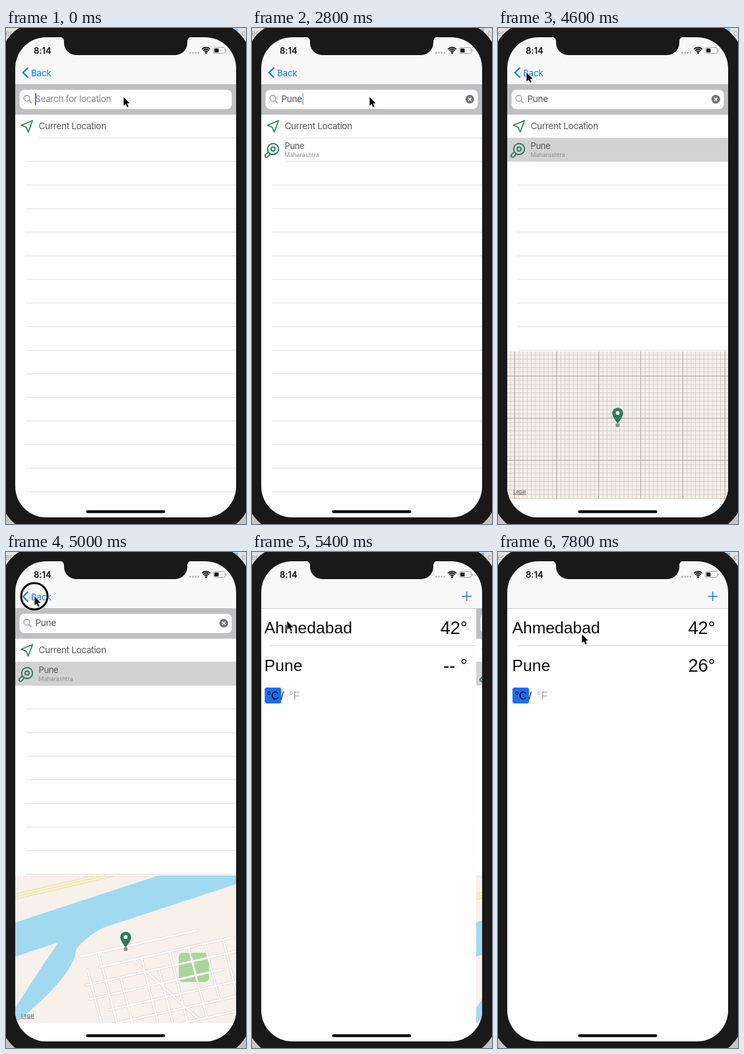
Write an HTML page with a canvas that moves like this. It is 364x750 px and loops after 8 s.

```html
<!DOCTYPE html>
<html lang="en">
<head>
<meta charset="utf-8">
<title>Location search</title>
<style>
html, body { margin: 0; width: 100%; height: 100%; overflow: hidden; background: #191919; }
canvas { display: block; width: 364px; height: 750px; }
</style>
</head>
<body>
<canvas id="stage"></canvas>
<script>
const LOOP = 8000, STEP = 200;
const LEFT = 14, RIGHT = 349, TOP = 14, BOTTOM = 740, WIDTH = RIGHT - LEFT;
const NAV = 85, ROW = 35.67, MAP_TOP = 489, MAP_H = 223;
const UI = 'Inter, sans-serif', HELV = '"Liberation Sans", Arial, sans-serif';
const BLUE = '#147be6', GREEN = '#2b7d5b', BEZEL = '#191919';
const GREY = '#85858a', LABEL = '#55565a', INK = '#0a0a0a';

const canvas = document.getElementById('stage');
const ctx = canvas.getContext('2d');
const dpr = window.devicePixelRatio || 1;
canvas.width = 364 * dpr;
canvas.height = 750 * dpr;

const QUERY = 'Pune', keyTimes = [1200, 1600, 2200, 2600];
const taps = [3800, 5000];
const pointerStart = { x: 178, y: 104 };
const pointerMoves = [
  { from: 2800, to: 3400, x: 143, y: 184 },
  { from: 4000, to: 4600, x: 43, y: 67 },
  { from: 5200, to: 5400, x: 53, y: 104 },
  { from: 6000, to: 6600, x: 190, y: 208 },
  { from: 6600, to: 7000, x: 321, y: 68 },
  { from: 7200, to: 7800, x: 127, y: 124 }
];

const clamp = v => Math.min(1, Math.max(0, v));

function seeded(seed) {
  return () => (seed = seed * 16807 % 2147483647) / 2147483647;
}
function rect(x, y, w, h, color) {
  ctx.fillStyle = color;
  ctx.fillRect(x, y, w, h);
}
function pill(x, y, w, h, r, color) {
  ctx.fillStyle = color;
  ctx.beginPath();
  ctx.roundRect(x, y, w, h, r);
  ctx.fill();
}
function stroke(color, width) {
  ctx.strokeStyle = color;
  ctx.lineWidth = width;
  ctx.stroke();
}
function disc(x, y, r, color) {
  ctx.fillStyle = color;
  ctx.beginPath();
  ctx.arc(x, y, r, 0, 7);
  ctx.fill();
}
function ring(x, y, r, color, width) {
  ctx.beginPath();
  ctx.arc(x, y, r, 0, 7);
  stroke(color, width);
}
function trace(pts) {
  ctx.beginPath();
  for (let i = 0; i < pts.length; i += 2) ctx.lineTo(pts[i], pts[i + 1]);
}
function line(pts, color, width) {
  trace(pts);
  stroke(color, width);
}
function text(str, x, y, size, color, opt = {}) {
  ctx.font = `${opt.weight || 400} ${size}px ${opt.font || UI}`;
  ctx.letterSpacing = (opt.gap || 0) + 'px';
  ctx.textAlign = opt.align || 'left';
  ctx.fillStyle = color;
  ctx.fillText(str, x, y);
  const width = ctx.measureText(str).width;
  ctx.letterSpacing = '0px';
  return width;
}
const body = (str, x, y, color, size = 13.7) => text(str, x, y, size, color, { gap: -0.38 });
const big = (str, x, y, size, color = INK, align = 'left') => text(str, x, y, size, color, { font: HELV, align });

function pointerAt(t) {
  let { x, y } = pointerStart;
  for (const m of pointerMoves) {
    const p = clamp((t - m.from) / (m.to - m.from));
    x += (m.x - x) * p;
    y += (m.y - y) * p;
  }
  return [x, y];
}

// critically damped spring, 0 to 1
function slideAt(t) {
  const u = Math.max(0, t - 5158) * 0.0227;
  return t >= 5600 ? 1 : 1 - (1 + u) * Math.exp(-u);
}

function desktop() {
  rect(0, 0, 364, 750, '#c4c4c4');
  rect(0, 0, 364, 30, '#e2e1e2');
  text('erA', -1, 12, 11, '#a5a5a5');
  rect(340, 1, 12, 12, '#6fc6e2');
  text('co', 357, 12, 11, '#a5a5a5');
  pill(-10, -10, 383, 774, 64, BEZEL);
}

function notch() {
  const l = 88, r = 275, bottom = 41;
  ctx.beginPath();
  ctx.moveTo(l - 8, TOP - 1);
  ctx.arcTo(l, TOP, l, bottom, 7);
  ctx.arcTo(l, bottom, r, bottom, 18.5);
  ctx.arcTo(r, bottom, r, TOP, 18.5);
  ctx.arcTo(r, TOP, r + 8, TOP - 1, 7);
  ctx.lineTo(r + 8, TOP - 1);
  ctx.fillStyle = BEZEL;
  ctx.fill();
}

function statusBar() {
  text('8:14', 42, 38.6, 13.2, '#111', { weight: 600, gap: -0.1 });
  for (let i = 0; i < 4; i++) disc(279.5 + i * 4.1, 37.5, 1.4, '#b9b9b9');
  for (let r = 3.4; r < 10; r += 2.8) {
    ctx.beginPath();
    ctx.arc(303.5, 38.5, r, -Math.PI * 0.75, -Math.PI * 0.25);
    stroke('#111', 1.9);
  }
  disc(303.5, 37.8, 1.4, '#111');
  ctx.beginPath();
  ctx.roundRect(314.5, 29.5, 18, 9, 2.5);
  stroke('#a5a5a5', 1);
  pill(316, 31, 6.5, 6, 1, '#111');
  rect(333.5, 32.5, 1.3, 3, '#a5a5a5');
}

function cross(x, y, r, color, width) {
  line([x - r, y, x + r, y], color, width);
  line([x, y - r, x, y + r], color, width);
}

function navBar(p) {
  rect(LEFT, TOP, WIDTH, NAV - TOP, '#f8f8f8');
  rect(LEFT, NAV, WIDTH, 0.7, '#b8b8b8');
  statusBar();
  ctx.globalAlpha = Math.pow(1 - p, 4.5);
  line([33.5, 60, 25.8, 67.5, 33.5, 75], BLUE, 2.3);
  body('Back', 38 + p * 28, 72.5, BLUE);
  ctx.globalAlpha = p;
  cross(325.7, 67, 7.3, BLUE, 1.5);
  ctx.globalAlpha = 1;
}

function cityRow(name, temp, y) {
  big(name, 21.5, y, 24.7);
  big(temp, 329.5, y + 1, 27.2, INK, 'right');
}

function cityPage(t) {
  rect(LEFT, NAV, WIDTH, BOTTOM - NAV, '#fff');
  cityRow('Ahmedabad', '42°', 123);
  rect(30, 141, RIGHT - 30, 0.9, '#d4d4d6');
  cityRow('Pune', t < 5800 ? '-- °' : '26°', 180);
  pill(22, 205, 25, 24, 3, '#1b6df3');
  big('°C', 25.5, 222.5, 16);
  big('/', 46.5, 222.5, 16);
  big('°F', 59, 222.5, 16, '#a6a6a6');
}

function clearButton(x, y) {
  disc(x, y, 6.6, '#747478');
  ctx.save();
  ctx.translate(x, y);
  ctx.rotate(Math.PI / 4);
  cross(0, 0, 3.5, '#fff', 1.3);
  ctx.restore();
}

function searchBar(t) {
  const typed = keyTimes.filter(k => k <= t);
  const lastKey = typed[typed.length - 1] || 0;
  const query = QUERY.slice(0, typed.length);
  rect(LEFT, NAV, WIDTH, 46, '#bfbfc2');
  pill(20.5, 93.5, 322, 29, 7, '#fff');
  ring(31.5, 106.3, 4.4, GREY, 1.1);
  line([34.7, 109.6, 38.5, 113.5], GREY, 1.2);
  let caretX = 44;
  if (query) {
    caretX += body(query, 44.5, 112, LABEL) + 1;
    clearButton(330.3, 107.7);
  } else {
    body('Search for location', 44, 112, '#8c8c90');
  }
  if (t < 4000) {
    ctx.globalAlpha = clamp(1 - (t - lastKey) % 1000 / 400);
    rect(caretX, 98.5, 1.8, 17.5, '#2b66e0');
    ctx.globalAlpha = 1;
  }
}

function arrowIcon() {
  trace([40.3, 140, 23.3, 147, 30.6, 150, 33.7, 157.3]);
  ctx.closePath();
  ctx.lineJoin = 'round';
  stroke(GREEN, 1.7);
  ctx.lineJoin = 'miter';
}

function placeIcon() {
  ring(32, 183, 8.3, GREEN, 1.9);
  ring(32, 183, 3, GREEN, 1.9);
  ctx.beginPath();
  ctx.moveTo(25.5, 187);
  ctx.lineTo(20.5, 191.4);
  ctx.bezierCurveTo(18.5, 193.5, 21, 197, 23.8, 194.8);
  ctx.lineTo(28, 190.2);
  stroke(GREEN, 1.8);
}

function resultList(t) {
  const found = t >= 1400, full = t >= 2800, picked = t >= 4000;
  arrowIcon();
  body('Current Location', 49.5, 153, LABEL);
  for (let i = 0; i < 16; i++) {
    const x = i <= found ? 50 : 30;
    rect(x, 165.8 + i * ROW, RIGHT - x, 0.8, '#d5d5d8');
  }
  if (!found) return;
  if (picked) rect(LEFT, 166, WIDTH, 36, '#d2d2d2');
  placeIcon();
  body(full ? 'Pune' : 'Pacific University', 49.5, 183, LABEL, 13);
  text(full ? 'Maharashtra' : 'Forest Grove, OR  97116', 49.5, 195, 8.8, '#8b8b8e');
}

function gridLines(gap, color) {
  for (let x = 24.7 - gap * Math.floor(10 / gap); x < RIGHT; x += gap) rect(x, MAP_TOP, 0.9, MAP_H, color);
  for (let y = 525.8 - gap * Math.floor(36 / gap); y < MAP_TOP + MAP_H; y += gap) rect(LEFT, y, WIDTH, 0.9, color);
}

function mapGrid() {
  rect(LEFT, MAP_TOP, WIDTH, MAP_H, '#f5f0ea');
  gridLines(6.38, '#d2cbc4');
  gridLines(63.8, '#a8a3a0');
}

function river() {
  const water = '#a1daf0';
  line([0, 590.5, 364, 471.5], water, 49);
  ctx.beginPath();
  ctx.moveTo(84, 584);
  ctx.quadraticCurveTo(50, 632, 10, 696);
  ctx.lineTo(10, 716);
  ctx.quadraticCurveTo(104, 640, 106, 602);
  ctx.quadraticCurveTo(120, 580, 160, 562);
  ctx.fillStyle = water;
  ctx.fill();
}

// slanted blocks whose streets start and stop at random cross streets
function streets() {
  const rnd = seeded(29), gapX = 26, gapY = 22, cols = 10, rows = 7;
  ctx.save();
  ctx.translate(112, 612);
  ctx.rotate(-0.22);
  ctx.beginPath();
  for (let r = 0; r < rows; r++) {
    const from = Math.floor(rnd() * 2), to = cols - Math.floor(rnd() * 4);
    ctx.moveTo(from * gapX, r * gapY);
    ctx.lineTo(to * gapX, r * gapY);
  }
  for (let c = 0; c < cols; c++) {
    const x = (c + rnd() * 0.5) * gapX;
    const from = Math.floor(rnd() * 3), to = rows - Math.floor(rnd() * 3);
    ctx.moveTo(x, from * gapY);
    ctx.lineTo(x + 4, to * gapY);
  }
  ctx.moveTo(3 * gapX, gapY);
  ctx.lineTo(6 * gapX, 6 * gapY);
  ctx.lineCap = 'round';
  stroke('#dcd5d0', 3.8);
  stroke('#fff', 2.4);
  ctx.restore();
}

function mapTiles() {
  rect(LEFT, MAP_TOP, WIDTH, MAP_H, '#f7f0eb');
  const highway = [10, 522, 164, 486];
  line(highway, '#e9dfb0', 9);
  line(highway, '#f8f2cf', 7);
  line(highway, '#e6dcae', 0.8);
  river();
  pill(262, 606, 46, 44, 6, '#a9d79a');
  streets();
}

function pin(x, y) {
  disc(x, y + 18, 3, 'rgba(80,80,80,.6)');
  ctx.beginPath();
  ctx.arc(x, y, 8.3, Math.PI * 0.87, Math.PI * 0.13);
  ctx.quadraticCurveTo(x + 5.5, y + 9, x, y + 15.5);
  ctx.quadraticCurveTo(x - 5.5, y + 9, x - 7.6, y + 3.3);
  ctx.fillStyle = GREEN;
  ctx.fill();
  disc(x, y - 0.3, 2.9, '#fff');
}

function mapPanel(t) {
  if (t < 4200) return;
  rect(LEFT, MAP_TOP - 1, WIDTH, BOTTOM - MAP_TOP + 1, '#fff');
  ctx.save();
  ctx.beginPath();
  ctx.rect(LEFT, MAP_TOP, WIDTH, MAP_H);
  ctx.clip();
  if (t < 4800) mapGrid(); else mapTiles();
  ctx.restore();
  pin(181.5, 582.5);
  text('Legal', 23, 704, 7.5, '#55504c');
  rect(23, 705, 20, 0.7, '#55504c');
}

function searchPage(t) {
  rect(LEFT, NAV, WIDTH, BOTTOM - NAV, '#fff');
  searchBar(t);
  resultList(t);
  mapPanel(t);
}

function pages(t, p) {
  if (p > 0) {
    ctx.save();
    ctx.translate(-0.3 * WIDTH * (1 - p), 0);
    cityPage(t);
    ctx.restore();
    rect(LEFT, NAV, WIDTH, BOTTOM - NAV, `rgba(0,0,0,${0.13 * (1 - p)})`);
  }
  if (p === 1) return;
  ctx.save();
  ctx.translate(p * WIDTH, 0);
  const shade = ctx.createLinearGradient(LEFT - 7, 0, LEFT, 0);
  shade.addColorStop(0, 'rgba(0,0,0,0)');
  shade.addColorStop(1, `rgba(0,0,0,${0.2 * (1 - p)})`);
  rect(LEFT - 7, NAV, 7, BOTTOM - NAV, shade);
  searchPage(t);
  ctx.restore();
}

function pointer(t) {
  const [x, y] = pointerAt(t);
  if (taps.includes(t)) {
    ring(x, y, 20, 'rgba(255,255,255,.7)', 5);
    ring(x, y, 20, '#000', 3);
  }
  ctx.save();
  ctx.translate(x + 0.4, y + 0.6);
  ctx.scale(0.92, 0.92);
  trace([0, 0, 0, 14, 3.2, 11.2, 5.6, 16.6, 8, 15.5, 5.7, 10.3, 10, 10]);
  ctx.closePath();
  ctx.lineJoin = 'round';
  stroke('#fff', 1.8);
  ctx.fillStyle = '#000';
  ctx.fill();
  ctx.restore();
}

function draw(t) {
  const p = slideAt(t);
  ctx.setTransform(dpr, 0, 0, dpr, 0, 0);
  desktop();
  ctx.save();
  ctx.beginPath();
  ctx.roundRect(LEFT, TOP, WIDTH, BOTTOM - TOP, 47);
  ctx.clip();
  pages(t, p);
  navBar(p);
  ctx.restore();
  notch();
  pill(121.5, 729.3, 120, 4.2, 2.1, '#000');
  pointer(t);
}

function tick(now) {
  draw(Math.floor(now % LOOP / STEP) * STEP);
  requestAnimationFrame(tick);
}
draw(0);
requestAnimationFrame(tick);
</script>
</body>
</html>
```
